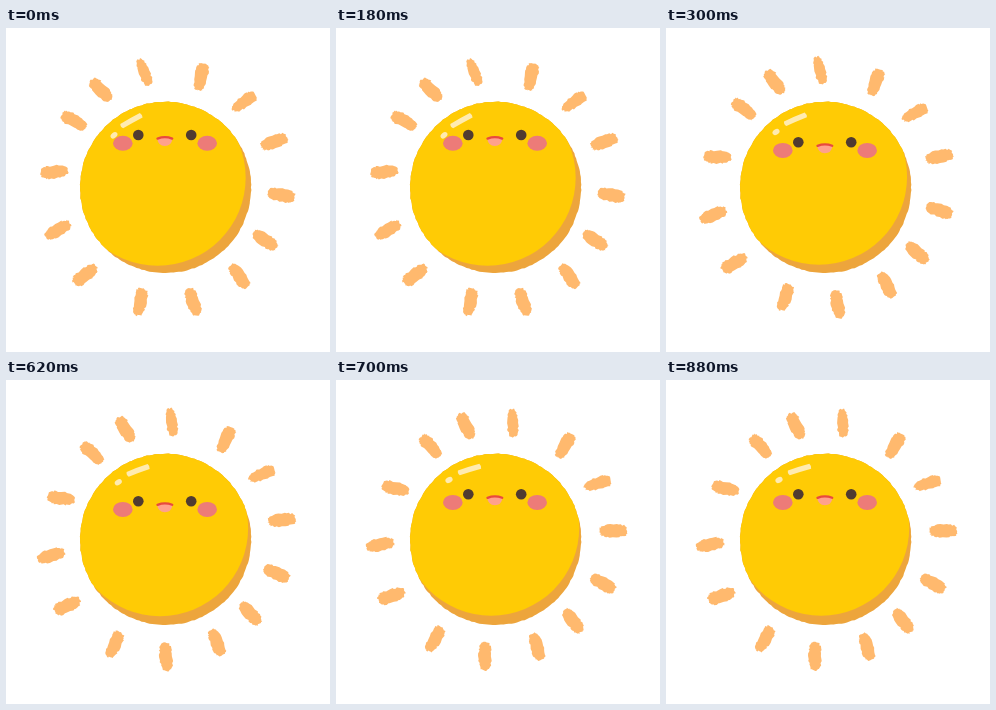
Write an HTML page that moves like this. It is 324 by 324 pixels and loops after 1 s.

```html
<!DOCTYPE html>
<html lang="en">
<head>
<meta charset="utf-8">
<title>Sunny face</title>
<style>
  html, body { margin: 0; width: 100%; height: 100%; overflow: hidden; background: #fff; }
  svg { display: block; width: 100vw; height: 100vh; }
</style>
</head>
<body>
<svg viewBox="0 0 324 324">
  <defs>
    <clipPath id="disc"><path class="disc"/></clipPath>
  </defs>
  <g id="rays" fill="#ffb96e"></g>
  <path class="disc" fill="#eda53c"/>
  <g clip-path="url(#disc)">
    <circle id="light" r="88.1" fill="#ffcb05"/>
  </g>
  <g fill="#ffebb0">
    <path id="streak" d="M-11.5-2.2Q0-3.2 11-2.9Q12.6-.2 11.3 2.4Q0 2.3-11 2.9Q-13 .6-11.5-2.2Z"/>
    <ellipse id="dot" rx="3.8" ry="2.7"/>
  </g>
  <g id="face">
    <g fill="#ed7b78">
      <ellipse cx="116.8" cy="115.2" rx="9.8" ry="7.5"/>
      <ellipse cx="201.2" cy="115.2" rx="9.8" ry="7.5"/>
    </g>
    <g fill="#503b31">
      <circle cx="132.3" cy="107" r="5.3"/>
      <circle cx="185.2" cy="107" r="5.3"/>
    </g>
    <path d="M151.3 111Q159 108 166.3 111Q165.5 118 158.8 118Q152.2 117.8 151.3 111Z" fill="#ffa18d"/>
    <path d="M151.5 110.6Q159 107.8 166.2 110.6" fill="none" stroke="#e8493f" stroke-width="2.3" stroke-linecap="round"/>
  </g>
</svg>
<script>
const $ = id => document.getElementById(id);
const RAD = Math.PI / 180;

// start ms, turn of the rays, face drop, streak x, y, tilt, dot x, y
const steps = [
  [0, 0, 0, 125.5, 92.6, -28, 108, 107.3],
  [300, 7.7, 7.2, 129.5, 91.2, -22, 110, 104],
  [500, 13.4, 14.2, 132.2, 90.4, -19, 112.3, 102.2],
  [700, 18.8, 7.2, 133.6, 89.5, -16, 113, 100]
];

// bearing, distance, lean, outer width, inner width
const rays = [
  [-11.2, 118, -11, 10, 11], [17, 116, -6, 15, 11], [41.8, 115.4, 13, 14, 10],
  [66.7, 116.5, 4, 13, 12], [93.5, 114.2, 7, 14, 12], [118, 111, 6, 13, 12],
  [140.7, 113.7, 4, 14, 11], [167.1, 117, -5, 12, 13], [193.3, 117, -3, 11, 14],
  [223.3, 119.6, 8, 14, 12], [248.9, 116.8, -9, 13, 12], [278.1, 114.1, -14, 13, 12],
  [305.8, 114.6, -6, 14, 11], [326, 118.2, -10, 13, 12]
];

let seed = 7;
const rand = () => (seed = seed * 16807 % 2147483647) / 2147483647;
const jitter = n => (rand() - 0.5) * n;
const soft = (v, p) => Math.sign(v) * Math.abs(v) ** p;

function outline(count, point) {
  const pts = Array.from({ length: count }, (_, i) =>
    point(i / count * 2 * Math.PI).map(v => v.toFixed(2)).join(' '));
  return 'M' + pts.join('L') + 'Z';
}

// Chalky tapered bar, pointing up
function bar(outer, inner) {
  return outline(52, a => {
    const y = soft(Math.cos(a), 0.65);
    const half = (outer + inner + (inner - outer) * y) / 4;
    return [half * soft(Math.sin(a), 0.7) + jitter(1.5), y * 13.9 + jitter(1.7)];
  });
}

for (const [bearing, dist, lean, outer, inner] of rays) {
  const p = document.createElementNS('http://www.w3.org/2000/svg', 'path');
  p.setAttribute('d', bar(outer, inner));
  p.setAttribute('transform',
    `translate(161 160) rotate(${bearing}) translate(0 ${-dist}) rotate(${lean})`);
  $('rays').append(p);
}

const disc = outline(200, a => {
  const r = 85.6 + jitter(0.7);
  return [159.6 + r * Math.cos(a), 159.4 + r * Math.sin(a)];
});
document.querySelectorAll('.disc').forEach(p => p.setAttribute('d', disc));

const place = (id, value) => $(id).setAttribute('transform', value);

function draw(now) {
  const t = now % 1000;
  const [, turn, drop, sx, sy, tilt, dx, dy] = steps.findLast(s => t >= s[0]);
  const a = (140.5 + turn) * RAD;
  place('rays', `rotate(${turn} 161 160)`);
  place('light', `translate(${159.6 - 12.6 * Math.sin(a)} ${159.4 + 12.6 * Math.cos(a)})`);
  place('streak', `translate(${sx} ${sy}) rotate(${tilt})`);
  place('dot', `translate(${dx} ${dy}) rotate(${tilt - 12})`);
  place('face', `translate(0 ${drop})`);
}

const start = performance.now();
function tick() {
  draw(performance.now() - start);
  requestAnimationFrame(tick);
}
tick();
</script>
</body>
</html>
```
